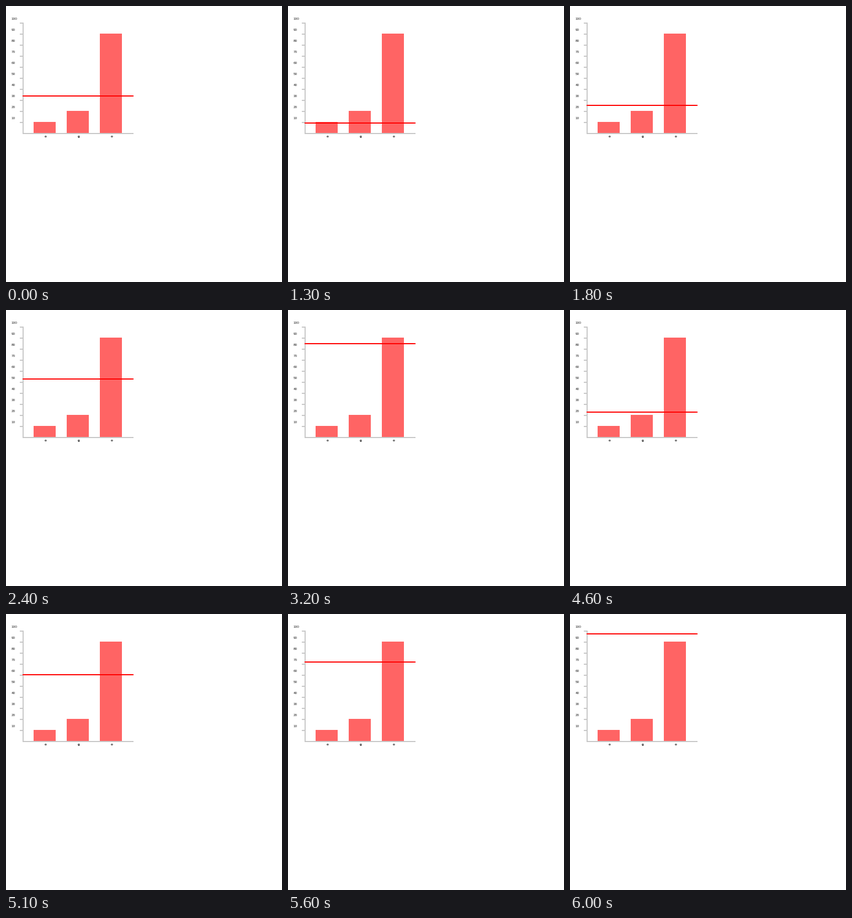
A matplotlib script that plays this animation: 500 by 500 pixels, repeating every 7 s.

```python
import numpy as np
import matplotlib.pyplot as plt
from matplotlib.animation import FuncAnimation
from matplotlib.patches import Rectangle

SIZE, DPI = 500, 100
STEP_MS, FRAMES = 100, 70
LEFT, BASE, SPAN = 30, 230, 200
GREY, BAR, RED = "#c8c8c8", "#ff6464", "#ff0000"

# Where the dragged line turns or rests: (time in ms, y in px)
TURNS = [(0, 163), (400, 237), (600, 237), (1000, 213), (1200, 213),
         (2400, 125), (3200, 61), (3500, 61), (4400, 196), (4600, 185),
         (5400, 83), (5500, 83), (5600, 87), (6000, 36)]


def smooth_path(keys, t):
    """Cubic path through the keys that never overshoots and eases at turns."""
    times, values = np.array(keys, float).T
    t = np.clip(t, times[0], times[-1])
    rate = np.diff(values) / np.diff(times)
    slope = np.zeros(len(times))
    for k in range(1, len(rate)):
        before, after = rate[k - 1], rate[k]
        if before * after > 0:
            slope[k] = 2 * before * after / (before + after)
    i = np.clip(np.searchsorted(times, t, side="right") - 1, 0, len(rate) - 1)
    length = times[i + 1] - times[i]
    u = (t - times[i]) / length
    blend = u * u * (3 - 2 * u)
    tangent = u * (1 - u) * ((1 - u) * slope[i] - u * slope[i + 1])
    return values[i] + blend * (values[i + 1] - values[i]) + length * tangent


fig = plt.figure(figsize=(SIZE / DPI, SIZE / DPI), dpi=DPI, facecolor="white")
ax = fig.add_axes([0, 0, 1, 1])
ax.set_xlim(0, SIZE)
ax.set_ylim(SIZE, 0)
ax.axis("off")


def box(x, y, width, height, color):
    return ax.add_patch(Rectangle((x, y), width, height, facecolor=color,
                                  linewidth=0, antialiased=False))


def label(x, y, text, px, **style):
    ax.text(x, y, text, fontsize=px * 72 / DPI, family="Liberation Sans",
            va="baseline", **style)


for k, (value, name) in enumerate(zip((10, 20, 90), "ogo")):
    x = LEFT + 20 + 60 * k
    box(x, BASE - 2 * value, 40, 2 * value, BAR)
    label(x + 22, BASE + 8, name, 6, color="black", weight="bold", ha="center")

box(LEFT, BASE - SPAN, 2, SPAN + 2, GREY)
box(LEFT, BASE, SPAN + 1, 2, GREY)
for value in range(10, 101, 10):
    y = BASE - 2 * value
    box(LEFT - 5, y, 6, 2, GREY)
    label(9.7, y - 5, str(value), 6.5, color="#222222")

threshold = box(LEFT, 0, SPAN + 1, 2, RED)


def update(frame):
    threshold.set_y(round(float(smooth_path(TURNS, frame * STEP_MS))) - 1)
    return (threshold,)


anim = FuncAnimation(fig, update, frames=FRAMES, interval=STEP_MS,
                     repeat=True, repeat_delay=0, blit=False)
plt.show()
```
